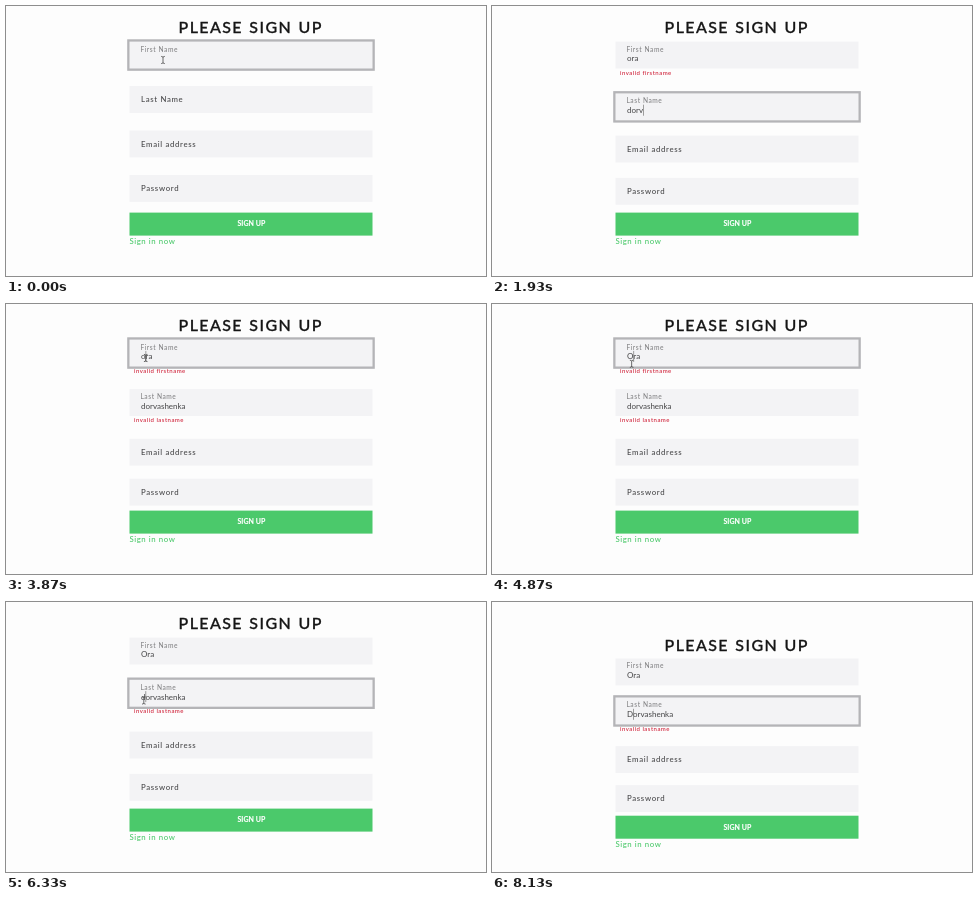
Recreate the animation shown at these times as an HTML page with a canvas. Size 480 by 270 pixels, loop 8.34 s.

```html
<!DOCTYPE html>
<html lang="en">
<head>
<meta charset="utf-8">
<title>Sign up form</title>
<style>
  html, body { margin: 0; width: 100%; height: 100%; overflow: hidden; background: #fdfdfd; }
  canvas { display: block; width: 480px; height: 270px; }
</style>
</head>
<body>
<canvas id="stage"></canvas>
<script>
const W = 480, H = 270, LOOP = 8340, STEP = 1000 / 15;
const canvas = document.getElementById('stage');
const ctx = canvas.getContext('2d');
const ratio = Math.max(1, window.devicePixelRatio || 1);
canvas.width = W * ratio;
canvas.height = H * ratio;
ctx.scale(ratio, ratio);

const FONT = 'Lato, "Open Sans", sans-serif';
const LEFT = 123.5, WIDTH = 243, FIELD_H = 26.9;
const GREEN = '#4bc96b';
const LABELS = ['First Name', 'Last Name', 'Email address', 'Password'];
const ERRORS = ['invalid firstname', 'invalid lastname'];
const SURNAME = 'dorvashenka';

const edits = [], focuses = [], legs = [];

function edit(at, field, value, index) {
  edits.push({ at, field, value, index });
}

// Types a word letter by letter at an even pace
function type(field, word, start, end) {
  for (let n = 1; n <= word.length; n++) {
    edit(start + (end - start) * (n - 1) / (word.length - 1), field, word.slice(0, n), n);
  }
}

function focus(at, field, errors) {
  focuses.push({ at, field, errors });
}

// Each pointer leg starts where the one before it ended
function move(show, arrive, hide, shape, x, y) {
  const from = legs[legs.length - 1] || { x, y };
  legs.push({ show, arrive, hide, shape, x, y, x0: from.x, y0: from.y });
}

focus(-1000, 0, []);
move(0, 0, 130, beam, 157, 54);
type(0, 'ora', 70, 270);
move(130, 130, 270, arrow, 229, 208);
move(270, 870, 1400, arrow, 175.2, 85.7);
focus(870, 1, [0]);
type(1, SURNAME, 1400, 2930);
move(2800, 3270, 3270, arrow, 140, 40);
move(3270, 3600, 3670, arrow, 235, 211);
focus(3670, 0, [0, 1]);
edit(3670, 0, 'ora', 1);
move(3670, 3870, 4270, beam, 139.7, 54);
edit(4270, 0, 'ra', 0);
edit(4530, 0, 'Ora', 1);
move(4670, 5270, 5730, beam, 139.2, 106);
focus(5200, 1, [1]);
edit(5200, 1, SURNAME, SURNAME.length);
move(5730, 6270, 6870, beam, 137.8, 98.5);
edit(6330, 1, SURNAME, 1);
edit(6800, 1, SURNAME.slice(1), 0);
edit(7130, 1, 'D' + SURNAME.slice(1), 1);
move(7330, 7530, 7670, arrow, 256, 181);

const clamp = v => Math.max(0, Math.min(1, v));
const mix = (a, b, p) => a + (b - a) * p;
const latest = (list, t) => list.filter(e => e.at <= t).pop();

function text(str, x, y, size, color, spacing = 0, weight = 400, bold = 0) {
  ctx.font = `${weight} ${size}px ${FONT}`;
  ctx.letterSpacing = spacing + 'px';
  ctx.fillStyle = ctx.strokeStyle = color;
  ctx.fillText(str, x, y);
  if (bold) {
    ctx.lineWidth = bold;
    ctx.strokeText(str, x, y);
  }
}

function rect(x, y, w, h, color) {
  ctx.fillStyle = color;
  ctx.fillRect(x, y, w, h);
}

function ring(top, amount) {
  const a = Math.pow(amount, 1.5), s = 2.3 * a;
  rect(LEFT - s, top - s, WIDTH + 2 * s, FIELD_H + 2 * s, `rgba(180,180,183,${a})`);
}

function label(i, top, p) {
  const k = mix(1, 0.85, p), c = Math.round(mix(72, 132, p));
  text(LABELS[i], mix(135, 134.4, p), top + mix(16.1, 9.9, p), 7.8 * k,
    `rgb(${c},${c},${c + 2})`, 0.66 * k, 500);
}

function caret(value, index, top) {
  ctx.font = `400 8px ${FONT}`;
  ctx.letterSpacing = '0px';
  const x = 135 + ctx.measureText(value.slice(0, index)).width;
  rect(x, top + 11.3, 0.7, 11, '#777');
}

function beam(x, y) {
  ctx.strokeStyle = '#484848';
  ctx.lineWidth = 0.8;
  ctx.beginPath();
  for (const side of [-1, 1]) {
    ctx.moveTo(x + 1.8 * side, y - 3.6);
    ctx.quadraticCurveTo(x, y - 3.6, x, y - 2.4);
    ctx.moveTo(x + 1.8 * side, y + 3.6);
    ctx.quadraticCurveTo(x, y + 3.6, x, y + 2.4);
  }
  ctx.moveTo(x, y - 2.4);
  ctx.lineTo(x, y + 2.4);
  ctx.stroke();
}

function arrow(x, y) {
  ctx.beginPath();
  [[0, 0], [0, 6], [1.4, 4.8], [2.4, 7], [3.3, 6.6], [2.4, 4.4], [4.2, 4.3]]
    .forEach(([dx, dy]) => ctx.lineTo(x + dx, y + dy));
  ctx.closePath();
  ctx.lineWidth = 0.8;
  ctx.lineJoin = 'round';
  ctx.strokeStyle = '#fff';
  ctx.stroke();
  ctx.fillStyle = '#111';
  ctx.fill();
}

function pointer(t) {
  const leg = legs.find(l => t >= l.show && t < l.hide);
  if (!leg) return;
  const p = leg.arrive > leg.show ? clamp((t - leg.show) / (leg.arrive - leg.show)) : 1;
  leg.shape(mix(leg.x0, leg.x, p * p), mix(leg.y0, leg.y, p * p));
}

// Free height is shared between the fields, less what errors and scrolling take
function fieldTops(errors, shift) {
  const gap = 17.55 - 2.25 * errors.length - 3.2 * shift;
  let top = 35.6 + 20.9 * shift;
  return LABELS.map((_, i) => {
    const y = top;
    top += FIELD_H + gap + (errors.includes(i) ? 9.6 : 0);
    return y;
  });
}

function draw(t) {
  const now = latest(focuses, t);
  const before = focuses[focuses.indexOf(now) - 1];
  const shift = clamp(Math.round((t - 7600) / 65) / 2);
  const fade = clamp((t - now.at) / 200);

  rect(0, 0, W, H, '#fdfdfd');
  ctx.wordSpacing = '1px';
  text('PLEASE SIGN UP', 172.6, 27.3 + 21.2 * shift, 16, '#161616', 1.39, 500, 0.3);
  ctx.wordSpacing = '0px';

  fieldTops(now.errors, shift).forEach((y, i) => {
    const active = i === now.field;
    if (active) ring(y, fade);
    else if (before && i === before.field) ring(y, 1 - fade);
    rect(LEFT, y, WIDTH, FIELD_H, '#f3f3f5');

    const own = latest(edits.filter(e => e.field === i), t);
    const value = own ? own.value : '';
    const rise = clamp((t - now.at) / 130);
    label(i, y, value ? 1 : active ? rise * (2 - rise) : 0);
    text(value, 135, y + 19.7, 8, '#444446');
    if (now.errors.includes(i)) text(ERRORS[i], 128, y + 33.3, 6, '#cf2038', 0.48, 500);
    if (active && t >= 70) {
      const from = Math.max(now.at, own ? own.at : 0);
      if (Math.floor((t - from) / 500) % 2 === 0) caret(value, own ? own.index : 0, y);
    }
  });

  const drop = 7.1 * shift;
  rect(LEFT, 206.6 + drop, WIDTH, 23, GREEN);
  text('SIGN UP', 231.4, 220.4 + drop, 7, '#fff', 0.05, 700, 0.15);
  text('Sign in now', 123.4, 238.1 + drop, 7.8, GREEN, 0.58, 500);
  pointer(t);
}

const start = performance.now();
function tick() {
  const elapsed = (performance.now() - start) % LOOP;
  const frame = Math.min(124, Math.floor((elapsed + 5) / STEP));
  draw(Math.round(frame * STEP / 10) * 10);
  requestAnimationFrame(tick);
}
tick();
</script>
</body>
</html>
```
